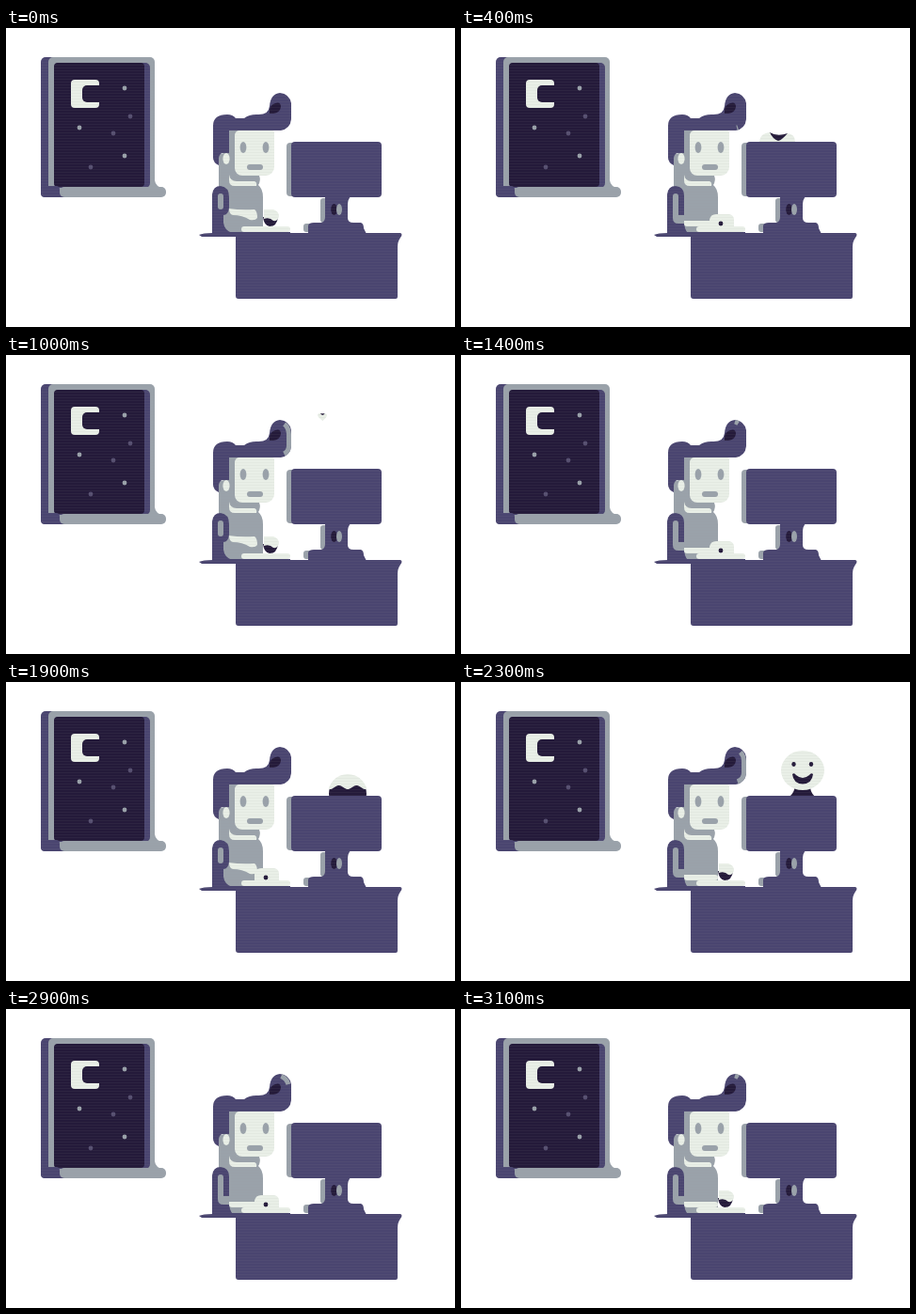
An HTML page with a canvas that plays this animation: 477x318 px, repeating every 3.2 s.

```html
<!DOCTYPE html>
<html lang="en">
<head>
<meta charset="utf-8">
<title>Late at the desk</title>
<style>
html, body { margin: 0; width: 100%; height: 100%; overflow: hidden; background: #fff; }
canvas { display: block; }
</style>
</head>
<body>
<canvas width="477" height="318"></canvas>
<script>
const ctx = document.querySelector('canvas').getContext('2d');
const DARK = '#241a3a', PURPLE = '#4a4570', GREY = '#9aa2aa', LIGHT = '#e9efe7', DIM = '#564f70';
const LOOP = 3200, STEP = 100;

function rect(x, y, w, h, r, color) {
  ctx.fillStyle = color;
  ctx.beginPath();
  ctx.roundRect(x, y, w, h, r);
  ctx.fill();
}

function oval(x, y, rx, ry, color) {
  ctx.fillStyle = color;
  ctx.beginPath();
  ctx.ellipse(x, y, rx, ry, 0, 0, Math.PI * 2);
  ctx.fill();
}

function shape(d, color) {
  ctx.fillStyle = color;
  ctx.fill(new Path2D(d));
}

// Interpolates between [time, value] pairs with a smooth ease.
function keyed(t, ...keys) {
  if (t <= keys[0][0]) return keys[0][1];
  for (let i = 1; i < keys.length; i++) {
    const [t0, v0] = keys[i - 1], [t1, v1] = keys[i];
    if (t <= t1) {
      const p = (t - t0) / (t1 - t0);
      return v0 + (v1 - v0) * p * p * (3 - 2 * p);
    }
  }
  return keys[keys.length - 1][1];
}

function placed(x, y, scale, draw) {
  ctx.save();
  ctx.translate(x, y);
  ctx.scale(scale, scale);
  draw();
  ctx.restore();
}

function drawWindow(t) {
  rect(37, 31, 40, 149, 5, PURPLE);
  rect(45, 31, 113, 145, 5, GREY);
  rect(51, 37, 102, 133, 5, PURPLE);
  rect(51, 37, 96, 132, 4, DARK);
  rect(37, 168, 20, 12, 4, PURPLE);
  rect(50, 174, 14, 6, 0, PURPLE);
  rect(57, 169, 113, 11, 5, GREY);
  shape('M153 162H158Q159 169 167 170H153Z', GREY);

  rect(69, 55, 30, 30, 4, LIGHT);
  rect(81, 61, 20, 18, [5, 0, 0, 5], DARK);

  const twinkle = keyed(t, [400, 0], [700, 1], [1000, 0]);
  placed(114, 112, twinkle, () => {
    shape('M0 -8Q2 -8 7 -2Q8 0 7 2Q2 8 0 8Q-2 8 -7 2Q-8 0 -7 -2Q-2 -8 0 -8Z', PURPLE);
    shape('M0 -3.5L3.5 0L0 3.5L-3.5 0Z', GREY);
  });
  for (const [x, y] of [[126, 64], [78, 106], [126, 136]]) oval(x, y, 2.4, 2.4, GREY);
  for (const [x, y] of [[132, 94], [90, 148]]) oval(x, y, 2.4, 2.4, DIM);
  oval(114, 112, 2.4, 2.4, twinkle > 0.3 ? GREY : DIM);
}

function drawHeart(t) {
  if (t < 300 || t > 1100) return;
  const y = keyed(t, [300, 142], [500, 112], [700, 97], [1100, 60]);
  placed(336, y, keyed(t, [800, 1], [1100, 0]), () => {
    shape('M-8 -16Q0 -11 11 -15L6 0H-5Z', DARK);
    shape('M1 -7Q5 -8 11 -15Q19 -14 19 -6Q19 0 12 7L1 16L-12 5Q-19 -1 -19 -7Q-18 -15 -8 -16Q-5 -9 1 -7Z', LIGHT);
  });
}

function drawSmiley(t) {
  if (t < 1700 || t > 2650) return;
  const y = keyed(t, [1700, 142], [1900, 119], [2300, 94], [2600, 46]);
  const fillLine = keyed(t, [1700, -14], [1900, -7], [2150, 26]);
  if (t >= 1900 && t < 2500) shape('M355 108H371Q370 116 376 122H349Q355 117 355 108Z', DARK);
  placed(363, y, keyed(t, [2350, 1], [2650, 0]), () => {
    const rx = keyed(t, [1900, 21], [2200, 23]);
    oval(0, 0, rx - 1, 20, DARK);
    ctx.save();
    ctx.beginPath();
    ctx.moveTo(-26, -26);
    ctx.lineTo(26, -26);
    for (let x = 26; x >= -26; x--) ctx.lineTo(x, fillLine + 2 * Math.cos(x / 3));
    ctx.clip();
    oval(0, 0, rx, 21, LIGHT);
    ctx.restore();
    if (t < 2100) return;
    oval(-9.5, -6.5, 2.2, 2.4, DARK);
    oval(9, -6.5, 2.2, 2.4, DARK);
    shape('M-11 4Q-9 2 -7 5Q0 11 7 5Q9 2 11 4Q10 14 0 14.5Q-10 14 -11 4Z', DARK);
  });
}

function drawDesk() {
  shape('M205 220Q209 218 220 218H238V217H302V218H419Q422 219 419 223Q416 227 416 233V286Q416 288 414 288H247Q244 288 244 285V222H208Z', PURPLE);
  rect(316, 208, 12, 9, 3, GREY);
  rect(334, 181, 12, 26, 3, GREY);
  shape('M339 178H367Q363 182 363 188V202Q363 207 369 207H377Q380 208 380 213L383 219H321V210Q322 207 327 207H335Q339 206 339 201Z', PURPLE);
  oval(348.5, 193, 3.3, 6, DARK);
  oval(354, 193, 3, 6, GREY);
  rect(298, 122, 30, 57, 4, GREY);
  rect(303, 121, 96, 59, 4, PURPLE);
}

function drawHair(t) {
  shape('M220 138V104Q220 92 235 92Q241 92 244 96H253Q258 92 266 92Q279 93 280 83Q281 70 291 69Q301 70 303 80V97Q302 107 292 109H243V133H229Q226 136 226 146Q220 143 220 138Z', PURPLE);
  shape('M280 91Q279 82 286 80Q292 78 292 84Q291 90 284 91Z', DARK);

  // Screen glow climbs the curl from its base to its tip.
  const glow = t % 1600;
  if (glow < 300) return;
  const from = keyed(glow, [300, 48], [700, 7], [1100, 5], [1400, 0]);
  const to = keyed(glow, [300, 52], [700, 42], [1100, 40], [1400, 4]);
  ctx.strokeStyle = GREY;
  ctx.lineWidth = 5;
  ctx.setLineDash([0, from, to - from, 200]);
  ctx.stroke(new Path2D('M291 71Q300 74 300.5 84V97Q300 104 293 106'));
  ctx.setLineDash([]);
}

function drawFace(t) {
  rect(237, 109, 20, 48, [0, 0, 0, 9], GREY);
  rect(243, 109, 42, 48, [5, 2, 9, 8], LIGHT);
  oval(234, 139, 3.6, 6, LIGHT);
  if (t < 2600 || t > 2700) {
    oval(252, 127, 3.4, 6, GREY);
    oval(276, 127, 3.4, 6, GREY);
  }
  rect(256, 145, 17, 6, 3, GREY);
}

function drawBody(t) {
  const beat = t % 800;
  const nearUp = beat < 400;
  const farUp = beat >= 700 || beat < 300;

  shape('M226 139Q226 133 232 133H240V150Q241 157 249 157H269Q271 162 268 167Q273 171 273 180V217H226Z', GREY);
  shape('M237 156Q238 163 245 163H264Q267 164 266 168H243Q237 168 237 162Z', LIGHT);

  if (farUp) {
    shape('M273 201H289Q288 211 280 211Q274 210 273 201Z', DARK);
    shape('M274 193H284Q290 195 290 200Q289 206 284 205Q280 201 274 203Z', LIGHT);
  } else {
    shape('M264 212V204Q265 198 271 198H285Q290 199 290 204V212Z', LIGHT);
    oval(276, 208, 2.4, 2.4, DARK);
  }
  rect(250, 211, 52, 6, 3, LIGHT);

  if (nearUp) {
    shape('M219 218V177Q220 168 228 168Q237 169 237 180V191Q236 199 231 199V207Q232 215 240 218Z', PURPLE);
    rect(225, 176, 6, 17, 3, GREY);
    shape('M237 192Q249 194 264 193Q267 195 267 202Q265 205 259 204Q251 199 241 199Q237 198 237 192Z', LIGHT);
  } else {
    shape('M219 218V177Q220 168 228 168Q237 169 237 178V205Q237 214 241 218Z', PURPLE);
    shape('M225 179Q225 176 228 176Q231 176 231 179V199H237V208H231Q225 208 225 202Z', GREY);
    rect(237, 205, 36, 6, [0, 3, 3, 3], LIGHT);
  }
}

function drawScanlines() {
  ctx.globalCompositeOperation = 'source-atop';
  ctx.fillStyle = 'rgba(150, 160, 160, 0.07)';
  for (let y = 0; y < 318; y += 3) ctx.fillRect(0, y, 477, 1);
  ctx.globalCompositeOperation = 'source-over';
}

function frame() {
  const t = Math.floor((performance.now() % LOOP) / STEP) * STEP;
  ctx.clearRect(0, 0, 477, 318);
  drawWindow(t);
  drawHeart(t);
  drawSmiley(t);
  drawDesk();
  drawHair(t);
  drawBody(t);
  drawFace(t);
  drawScanlines();
  requestAnimationFrame(frame);
}
frame();
</script>
</body>
</html>
```
